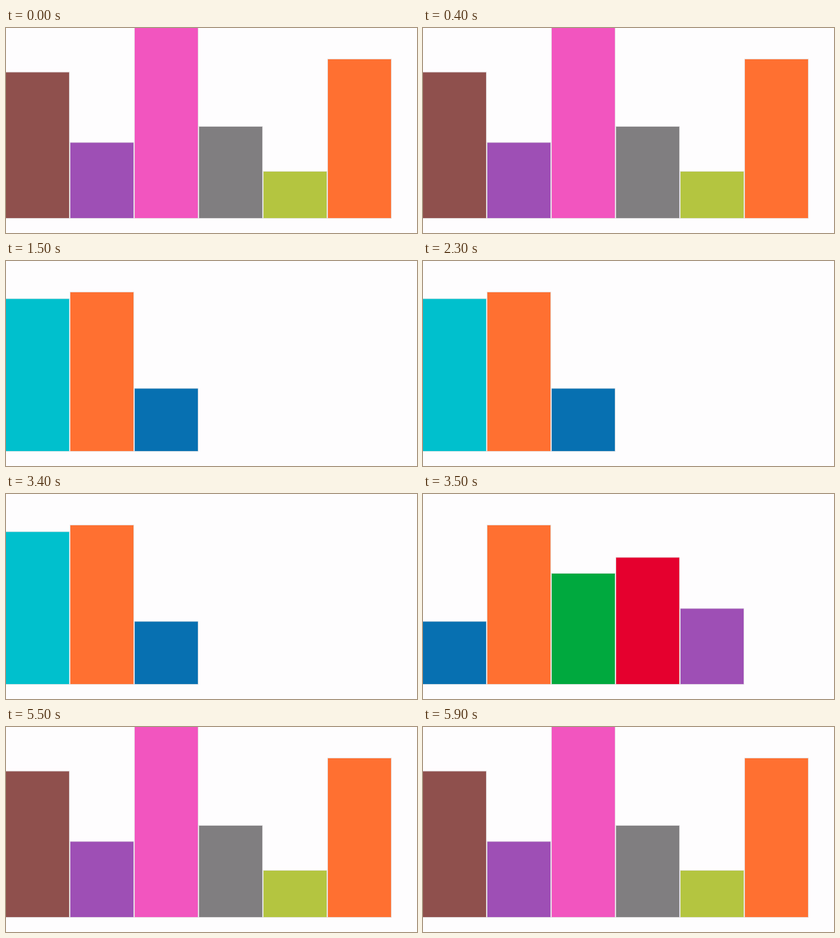
A matplotlib script for the animation above (6600 ms loop, 600 by 301 pixels).

```python
import matplotlib.pyplot as plt
from matplotlib.animation import FuncAnimation
from matplotlib.patches import Rectangle

W, H, DPI = 600, 301, 100
STEP_MS, LOOP_MS = 100, 6600
PITCH, BASE = 94, 279.6
PAPER, EDGE = "#fefdfe", "#e6e4e6"

# colour -> top of the bar in pixels
BROWN = ("#8f504d", 64.8)
PURPLE = ("#9e4fb5", 168)
PINK = ("#f255bf", -20)
GRAY = ("#807e80", 144.6)
OLIVE = ("#b4c540", 210.4)
ORANGE = ("#ff7031", 45.6)
TEAL = ("#00c0cd", 55.2)
BLUE = ("#0770b1", 187)
GREEN = ("#00a93e", 116.4)
RED = ("#e5002e", 93)

SIX = [BROWN, PURPLE, PINK, GRAY, OLIVE, ORANGE]
THREE = [TEAL, ORANGE, BLUE]
FIVE = [BLUE, ORANGE, GREEN, RED, PURPLE]

# start time in ms and the bars shown from then on
SCHEDULE = [(0, SIX), (1500, THREE), (3500, FIVE), (5500, SIX)]

fig = plt.figure(figsize=(W / DPI, H / DPI), dpi=DPI, facecolor=PAPER)
ax = fig.add_axes([0, 0, 1, 1])
ax.set_xlim(0, W)
ax.set_ylim(H, 0)
ax.axis("off")


def make_bar(i):
    left = PITCH * i - 0.4
    bar = Rectangle((left, 0), PITCH - 1, BASE, ec=EDGE,
                    lw=0.8 * 72 / DPI, snap=False)
    return ax.add_patch(bar)


bars = [make_bar(i) for i in range(len(SIX))]


def update(frame):
    now = frame * STEP_MS
    shown = [group for start, group in SCHEDULE if start <= now][-1]
    for i, bar in enumerate(bars):
        bar.set_visible(i < len(shown))
        if i < len(shown):
            color, top = shown[i]
            bar.set_facecolor(color)
            bar.set_y(top)
            bar.set_height(BASE - top)
    return bars


anim = FuncAnimation(fig, update, frames=LOOP_MS // STEP_MS,
                     init_func=lambda: update(0),
                     interval=STEP_MS, repeat=True, repeat_delay=0)
plt.show()
```
